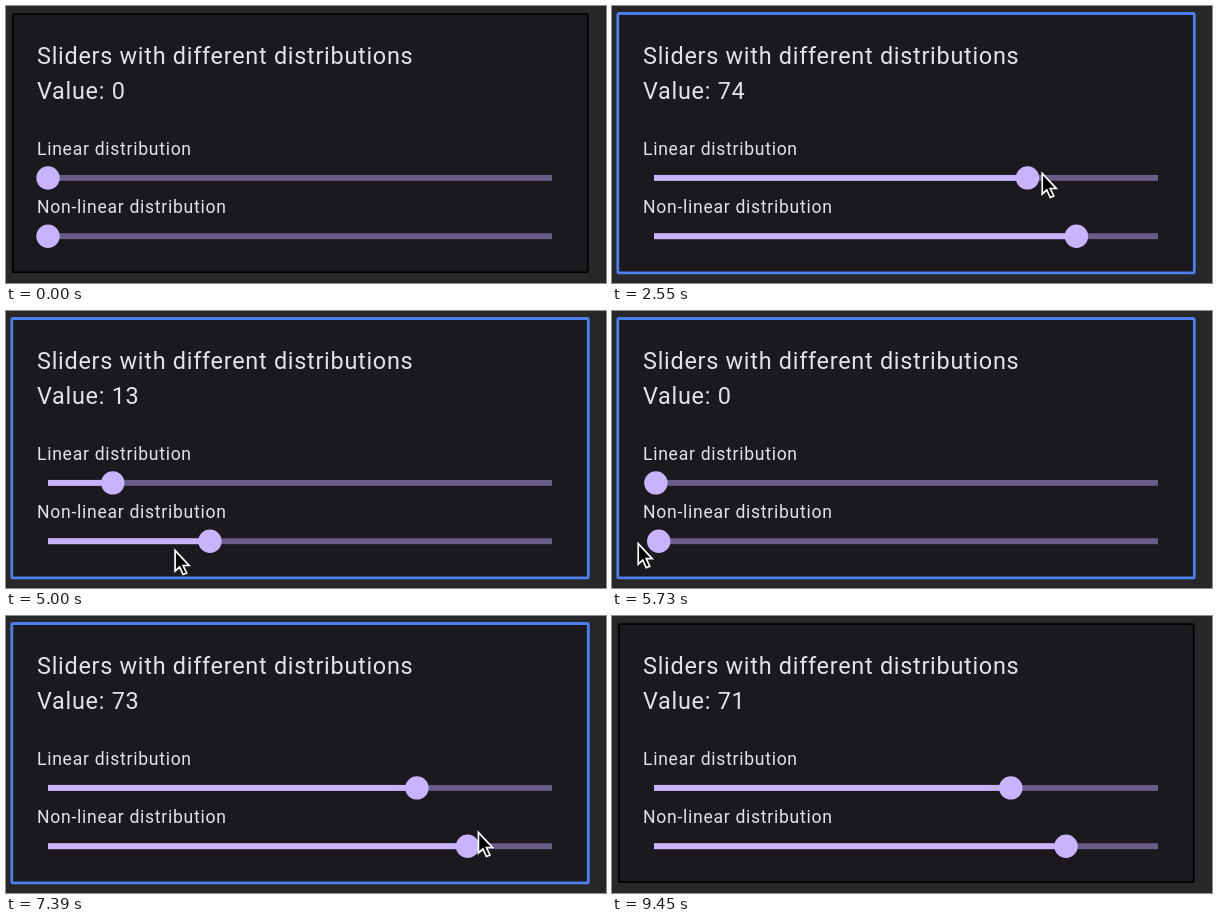
Animation, 600 px wide and 277 px high, one loop 10 s. Source, as an HTML page:

```html
<!DOCTYPE html>
<html lang="en">
<head>
<meta charset="utf-8">
<title>Sliders</title>
<style>
  html, body { margin: 0; width: 100%; height: 100%; overflow: hidden; background: #27272a; }
  svg { display: block; width: 600px; height: 277px; }
  text { font: 17.58px Roboto, sans-serif; letter-spacing: .715px; fill: #e5e1e6; white-space: pre; }
  .title { font-size: 23.44px; }
  .rail { fill: #685c88; }
  .fill, .thumb { fill: #c9b2fe; }
</style>
</head>
<body>
<svg viewBox="0 0 600 277">
  <rect id="panel" fill="#1b191d"/>
  <text class="title" x="31" y="58">Sliders with different distributions</text>
  <text class="title" x="31" y="93" id="value"></text>
  <text x="31" y="149">Linear distribution</text>
  <text x="31" y="207">Non-linear distribution</text>
  <g id="linear" transform="translate(0 171.9)">
    <rect class="rail" x="42" y="-2.95" width="504" height="5.9"/>
    <rect class="fill" x="42" y="-2.95" height="5.9"/>
    <circle class="thumb" r="11.7"/>
  </g>
  <g id="curved" transform="translate(0 230.2)">
    <rect class="rail" x="42" y="-2.95" width="504" height="5.9"/>
    <rect class="fill" x="42" y="-2.95" height="5.9"/>
    <circle class="thumb" r="11.7"/>
  </g>
  <path id="cursor" d="M1 1.5V22L5.5 18L9 25.5L12.5 24L9 16.5H15Z" fill="#000" stroke="#fff" stroke-width="1.7"/>
</svg>
<script>
const LOOP = 10000, START = 42, LENGTH = 504, SWITCH = 3600;
const $ = id => document.getElementById(id);

const smooth = u => (1 - Math.cos(Math.PI * u)) / 2;
const steady = u => u;

// A timeline starts at one position and makes moves one after another
const move = (begin, end, to, ease = smooth) => ({ begin, end, to, ease });
const timeline = (from, ...moves) => t => moves.reduce((pos, m) => {
  const u = Math.min(1, Math.max(0, (t - m.begin) / (m.end - m.begin)));
  return pos + (m.to - pos) * m.ease(u);
}, from);

const linearThumb = timeline(42, move(1230, 2910, 517, steady), move(3060, 3360, 464));
const curvedThumb = timeline(495, move(3740, 5870, 42), move(5920, 7680, 544, steady), move(7900, 8500, 454));
const pointerX = timeline(12, move(30, 1000, 44), move(1215, 2890, 527, steady), move(3060, 3360, 470),
  move(3520, 3740, 487), move(3740, 5760, 25), move(5900, 7640, 546, steady), move(7880, 8480, 446));
const pointerY = timeline(290, move(30, 1000, 166), move(3520, 3740, 210), move(3740, 4700, 238),
  move(5000, 7000, 215), move(8700, 9420, 290));

// The first fifth of the values takes half of the non-linear rail
const curve = p => p < .2 ? p * 2.5 : .5 + (p - .2) * .625;
const uncurve = q => q < .5 ? q / 2.5 : .2 + (q - .5) / .625;
const fraction = x => (x - START) / LENGTH;

function setAttrs(el, attrs) {
  for (const name in attrs) el.setAttribute(name, attrs[name]);
}

function setSlider(id, value) {
  const width = value * LENGTH;
  setAttrs($(id).querySelector('.fill'), { width });
  setAttrs($(id).querySelector('.thumb'), { cx: START + width });
}

function draw(now) {
  const t = now % LOOP;
  const p = t < SWITCH ? fraction(linearThumb(t)) : uncurve(fraction(curvedThumb(t)));
  setSlider('linear', p);
  setSlider('curved', curve(p));
  $('value').textContent = 'Value: ' + Math.round(p * 100);

  const x = pointerX(t), y = pointerY(t);
  setAttrs($('cursor'), { transform: `translate(${x} ${y})` });
  setAttrs($('panel'), y < 268
    ? { x: 5.8, y: 7.5, width: 576.5, height: 259.4, rx: 1.5, stroke: '#4b7fee', 'stroke-width': 2.8 }
    : { x: 6.8, y: 8.2, width: 575, height: 258, rx: 1, stroke: '#000', 'stroke-width': 1.8 });
  requestAnimationFrame(draw);
}
requestAnimationFrame(draw);
</script>
</body>
</html>
```
